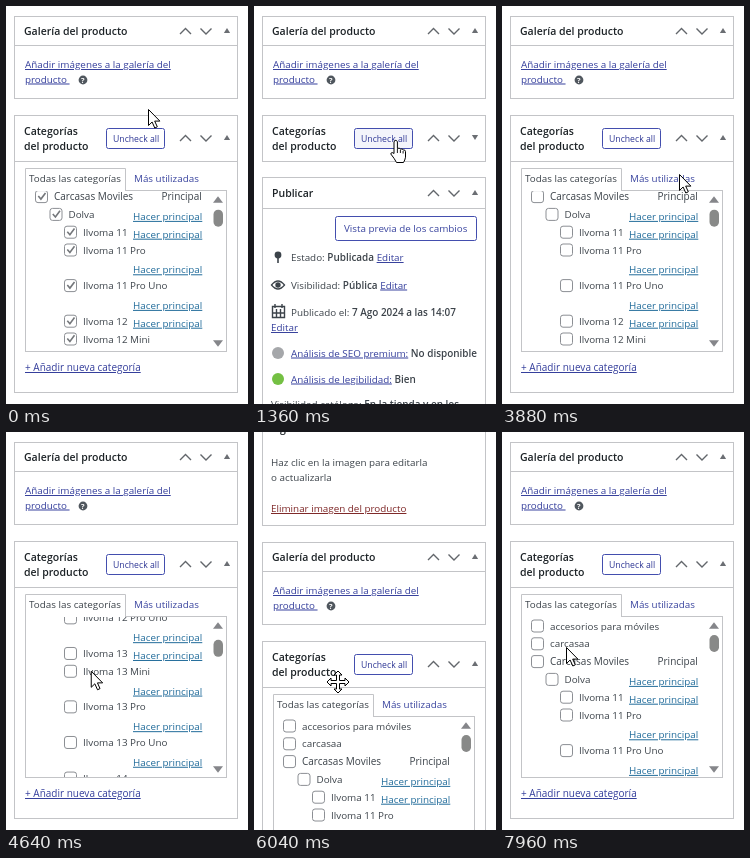
Write an HTML page that moves like this. It is 242 px wide and 398 px high and loops after 8 s.

```html
<!DOCTYPE html>
<html lang="es">
<head>
<meta charset="utf-8">
<style>
  html, body { margin: 0; width: 100%; height: 100%; overflow: hidden; background: #fff; }
  svg { display: block; }
  text { font: 9.85px "Open Sans", "Noto Sans", sans-serif; fill: #3c434a; white-space: pre; }
  .bold { font-size: 9.95px; font-weight: 600; fill: #3c434a; }
  .medium { font-size: 10px; font-weight: 500; }
  .title { font-size: 10.5px; font-weight: 600; fill: #1d2327; }
  .link { fill: #353f9c; text-decoration: underline; }
  .plain { fill: #3a459f; }
  .main { fill: #1f6a99; text-decoration: underline; }
  .delete { fill: #7d2626; text-decoration: underline; }
  .small { font-size: 8.7px; fill: #2c3594; }
  .panel { fill: #fff; stroke: #c3c4c7; }
  .line { fill: none; stroke: #c3c4c7; }
  .button { fill: #fff; stroke: #434eae; }
  .chevron { fill: none; stroke: #62666b; stroke-width: 1.4; }
  .box { fill: #fff; stroke: #8c8f94; }
  .check { fill: none; stroke: #74777b; stroke-width: 1.6; }
  .pointer { fill: #fff; stroke: #000; stroke-linejoin: round; }
</style>
</head>
<body>
<svg id="stage" width="242" height="398" viewBox="0 0 242 398"></svg>
<script>
const LOOP = 8000, LINE = 17.8;
const CLOSE_AT = 960, OPEN_AT = 2880;

// Text is placed by the middle of its lower-case letters.
const text = (x, y, content, cls = '') =>
  `<text x="${x}" y="${y + 3.5}" class="${cls}">${content}</text>`;
const span = (content, cls) => `<tspan class="${cls}">${content}</tspan>`;
const rect = (x, y, w, h, cls, r = 0) =>
  `<rect x="${x + .5}" y="${y + .5}" width="${w}" height="${h}" rx="${r}" class="${cls}"/>`;
const path = (d, cls) => `<path d="${d}" class="${cls}"/>`;
const triangle = (x, y, half, height, color, id = '') =>
  `<path id="${id}" d="M${x - half} ${y + height / 2}h${2 * half}l${-half} ${-height}z" fill="${color}"/>`;
const headerIcons = (y, id) =>
  path(`M174 ${y + 3}l5.5 -5.5 5.5 5.5M194.5 ${y - 2.5}l5.5 5.5 5.5 -5.5`, 'chevron') +
  triangle(221, y - .5, 3.1, 5, '#6b6e73', id + 'Up') +
  triangle(221, y - .5, 3.1, -5, '#6b6e73', id + 'Down');

function categoryRows() {
  const rows = [
    { name: 'accesorios para móviles', level: 0 },
    { name: 'carcasaa', level: 0 },
    { name: 'Carcasas Moviles', level: 0, principal: true },
    { name: 'Dolva', level: 1, lines: 1 }
  ];
  const full = ['', ' Mini', ' Pro', ' Pro Uno'];
  const plus = ['', ' Plus', ' Pro', ' Pro Uno'];
  const models = { 11: ['', ' Pro', ' Pro Uno'], 12: full, 13: full, 14: plus,
    15: ['', ' Pro', ' Pro Uno'], 16: ['', ' E', ' Plus', ' Pro', ' Pro Uno'] };
  for (const [number, variants] of Object.entries(models))
    for (const variant of variants)
      rows.push({ name: `Ilvoma ${number}${variant}`, level: 2, lines: variant ? 2 : 1 });

  let y = 194;
  return rows.map(({ name, level, lines, principal }) => {
    const x = 29 + level * 14.5;
    let out = rect(x, y - 6.5, 12, 12, 'box', 2.5);
    if (level || principal) out += path(`M${x + 3.3} ${y - .5}l2.6 3 4.6 -6.2`, 'check');
    out += text(x + 19, y, name, principal ? 'medium' : '');
    if (principal) out += text(155.5, y, 'Principal', 'medium');
    if (lines) out += text(127, y + (lines - 1) * LINE + 2, 'Hacer principal', 'main');
    y += (lines || 1) * LINE;
    return out;
  }).join('');
}

const imagePanel =
  rect(8, -120, 223, 113, 'panel') +
  text(26, -104, 'g', 'title') +
  text(17, -70, 'Haz clic en la imagen para editarla') +
  text(17, -55, 'o actualizarla') +
  text(17, -23.5, 'Eliminar imagen del producto', 'delete');

const galleryPanel =
  rect(8, 10, 223, 82, 'panel') + path('M8 39.5h223', 'line') +
  text(18, 25, 'Galería del producto', 'title') + headerIcons(25, 'gallery') +
  text(19, 58.5, 'Añadir imágenes a la galería del', 'link') +
  text(19, 73, 'producto ', 'link') +
  '<circle cx="77" cy="74" r="4.4" fill="#50575e"/>' +
  '<text x="75" y="76.8" style="font-size:7.5px;font-weight:700;fill:#fff">?</text>';

const categoryPanel =
  `<g id="categoryBody">${rect(8, 109, 223, 277, 'panel')}
    ${path('M8 155.5h223', 'line')}
    ${rect(19, 184, 201, 161, 'line')}
    <path d="M19.5 185v-22.5h100v22.5" fill="#fff" stroke="#c3c4c7"/>
    <path d="M20 184.5h99" stroke="#fff"/>
    ${text(23, 172.5, 'Todas las categorías')}
    ${text(128, 172.5, 'Más utilizadas', 'plain')}
    <svg x="20" y="185" width="200" height="160"><g id="list">${categoryRows()}</g></svg>
    ${triangle(212, 193.5, 5, 6.5, '#85868a')}${triangle(212, 337.5, 5, -6.5, '#85868a')}
    <rect id="thumb" x="207.5" y="203" width="9.5" height="17" rx="4.7" fill="#888988"/>
    ${text(19, 361.5, '+ Añadir nueva categoría', 'link medium')}
  </g>
  <g id="categoryClosed">${rect(8, 109, 223, 46, 'panel')}</g>` +
  text(18, 125, 'Categorías', 'title') + text(18, 140, 'del producto', 'title') +
  `<g id="uncheck">${rect(100, 122, 58, 20, 'button', 2)}</g>` +
  text(107, 132, 'Uncheck all', 'small') + headerIcons(132, 'category');

const edit = ' ' + span('Editar', 'link');
const publishPanel = `<g id="publish">` +
  rect(8, 171, 223, 300, 'panel') + path('M8 202.5h223', 'line') +
  text(18, 187, 'Publicar', 'title') + headerIcons(187, 'publish') +
  rect(81, 210, 141, 24, 'button', 2) +
  text(90, 222.5, 'Vista previa de los cambios', 'plain') +
  '<path d="M24 257v-5" stroke="#3c434a" stroke-width="1.6"/><circle cx="24" cy="249" r="3.4" fill="#3c434a"/>' +
  text(37, 251.5, 'Estado: ' + span('Publicada', 'bold') + edit) +
  '<path d="M17.5 279q6.5 -8 13 0q-6.5 8 -13 0z" fill="#fff" stroke="#3c434a" stroke-width="1.3"/><circle cx="24" cy="279" r="2.7" fill="#3c434a"/>' +
  text(37, 279, 'Visibilidad: ' + span('Pública', 'bold') + edit) +
  '<path d="M18.5 300.5h12v11h-12zM21 298v4M28 298v4M22.5 303v8M26.5 303v8M18 307h13" fill="none" stroke="#3c434a" stroke-width="1.4"/>' +
  text(37, 306.5, 'Publicado el: ' + span('7 Ago 2024 a las 14:07', 'bold')) +
  text(17, 321.5, 'Editar', 'link') +
  '<circle cx="24" cy="347" r="6" fill="#a5a7aa"/>' +
  text(37, 347, span('Análisis de SEO premium:', 'link') + ' ' + span('No disponible', 'bold')) +
  '<circle cx="24" cy="373" r="6" fill="#74c043"/>' +
  text(37, 373, span('Análisis de legibilidad:', 'link') + ' ' + span('Bien', 'bold')) +
  text(17, 398, 'Visibilidad catálogo: ' + span('En la tienda y en los', 'bold')) + '</g>';

const cursors =
  `<g id="cursor">
    <g id="arrow">${path('M.5 .5v16l3.600 -3.500 2.700 6 2.500 -1.200 -2.600 -5.700h5.200z', 'pointer')}</g>
    <g id="hand">${path('M-2 1.5q2 -2.5 3.4 0v7q2 -1 3 .6q2 -.8 2.7 .8q2.3 -.4 2.4 1.8v5.5q-.5 3 -2 5.3h-7q-2 -4 -5.7 -8.5q.5 -2.6 3.2 -.5z', 'pointer')}
      <path d="M1.4 9v4M4.4 10v3M7.1 11v2.5" stroke="#000" stroke-width=".9"/></g>
    <g id="move">${path('M0 -11l4 4h-2.5v5.5h5.5v-2.5l4 4 -4 4v-2.5h-5.5v5.5h2.5l-4 4 -4 -4h2.5v-5.5h-5.5v2.5l-4 -4 4 -4v2.5h5.5v-5.5h-2.5z', 'pointer')}</g>
  </g>`;

const stage = document.getElementById('stage');
stage.innerHTML = `<g id="page">${imagePanel}${galleryPanel}${categoryPanel}${publishPanel}</g>${cursors}`;

const el = id => document.getElementById(id);
const show = (id, visible) => el(id).style.display = visible ? '' : 'none';
const move = (id, x, y) => el(id).setAttribute('transform', `translate(${x} ${y})`);
const ease = p => { p = Math.min(1, Math.max(0, p)); return p * p * (3 - 2 * p); };

// Pointer stops: time, x, y.
const stops = [
  [0, 142, 103], [640, 143, 135], [1360, 142, 134], [1480, 142, 136],
  [1840, 160, 300], [2100, 125, 262], [2400, 176, 322], [2660, 150, 258],
  [2740, 145, 139], [3040, 145, 138], [3600, 165, 150], [3880, 177, 168],
  [4240, 90, 240], [5160, 77, 237], [6040, 84, 250], [6200, 84, 250],
  [6600, 118, 165], [7240, 118, 165], [7960, 64, 215], [8000, 64, 215]
];
function pointerAt(t) {
  const i = Math.max(1, stops.findIndex(s => s[0] > t));
  const [t0, x0, y0] = stops[i - 1], [t1, x1, y1] = stops[i];
  const p = ease((t - t0) / (t1 - t0));
  return [x0 + (x1 - x0) * p, y0 + (y1 - y0) * p];
}

// Wheel notches glide for 150 ms each.
const notch = (t, start) => ease((t - start) / 150);
function listScroll(t) {
  const first = 39;
  let y = first;
  for (let i = 0; i < 5; i++) y += 100 * notch(t, 4280 + 160 * i);
  for (let i = 0; i < 6; i++) y -= (first + 500) / 6 * notch(t, 5280 + 90 * i);
  return y;
}

function draw(t) {
  const closed = t >= CLOSE_AT && t < OPEN_AT;
  const page = 100 * (notch(t, 5880) - notch(t, 6885));
  const scroll = listScroll(t);
  const [x, y] = pointerAt(t);
  const localY = y - page;
  const overButton = x > 100 && x < 159 && localY > 122 && localY < 143;
  const overHeader = localY > 109 && localY < 156 && x > 8 && x < 232;
  const kind = overButton ? 'hand' : overHeader ? 'move' : 'arrow';

  move('page', 0, page);
  move('list', -20, -185 - scroll);
  el('thumb').setAttribute('y', 203 + scroll * .0185);
  show('categoryBody', !closed);
  show('categoryClosed', closed);
  move('publish', 0, closed ? 0 : 231);
  for (const id of ['gallery', 'category', 'publish']) {
    const folded = id === 'category' && closed;
    show(id + 'Up', !folded);
    show(id + 'Down', folded);
  }
  for (const mark of document.querySelectorAll('.check'))
    mark.style.display = t < CLOSE_AT ? '' : 'none';
  el('uncheck').firstChild.style.fill = overButton ? '#f3f4fb' : '';

  move('cursor', x, y);
  for (const id of ['arrow', 'hand', 'move']) show(id, id === kind);
}

const start = performance.now();
function tick() {
  draw((performance.now() - start) % LOOP);
  requestAnimationFrame(tick);
}
tick();
</script>
</body>
</html>
```
